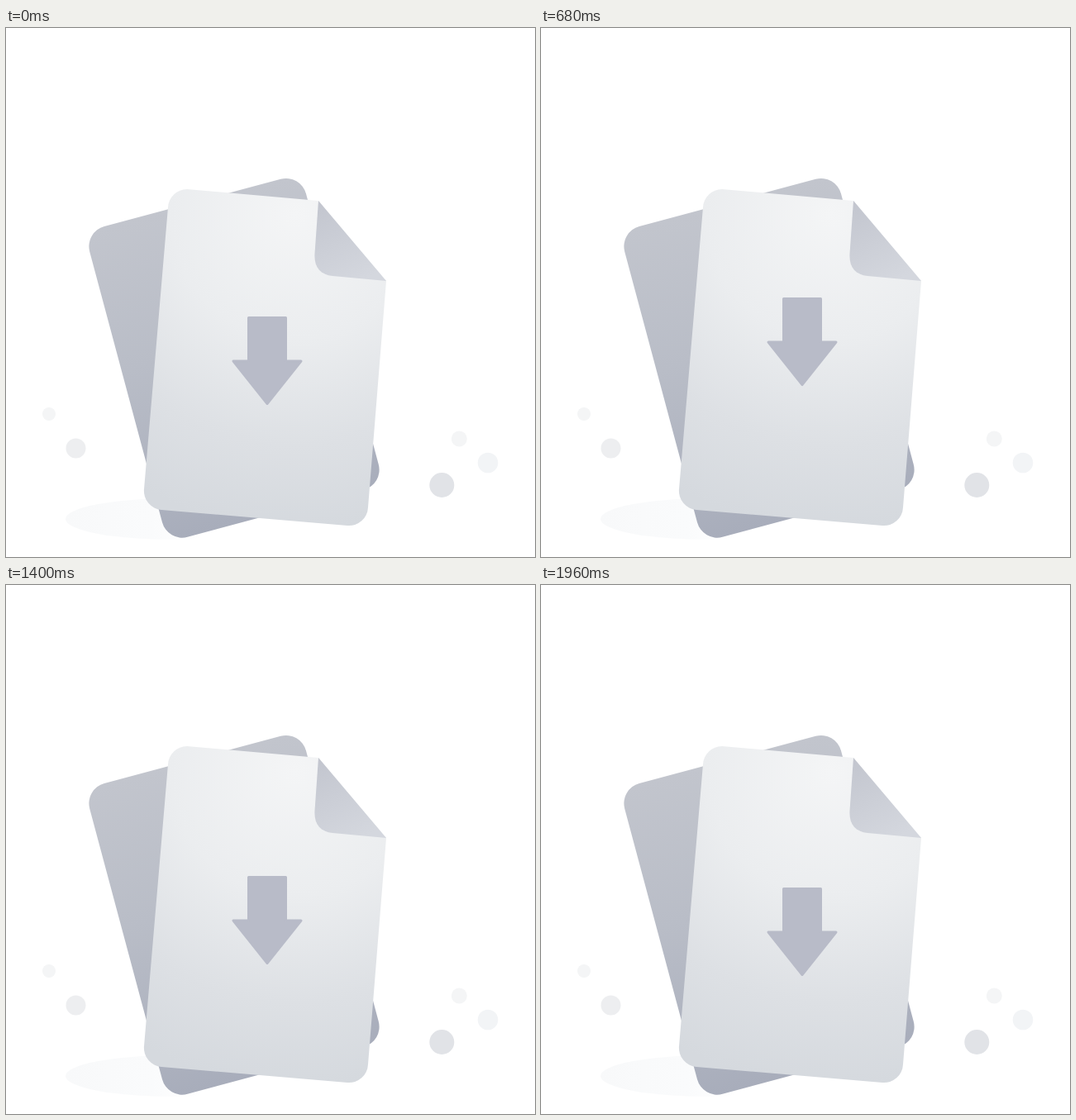
Write an HTML page that moves like this. It is 640 px wide and 640 px high and loops after 2 s.

```html
<!DOCTYPE html>
<html lang="en">
<head>
<meta charset="utf-8">
<title>Download</title>
<style>
  html, body { margin: 0; width: 100%; height: 100%; overflow: hidden; background: #fff; }
  svg { display: block; width: 100vw; height: 100vh; }
</style>
</head>
<body>
<svg viewBox="0 0 640 640">
  <defs>
    <linearGradient id="back" x1="0" y1="0" x2="0" y2="1">
      <stop offset="0" stop-color="#c2c5cd"/>
      <stop offset=".45" stop-color="#b9bdc7"/>
      <stop offset="1" stop-color="#a8adbb"/>
    </linearGradient>
    <radialGradient id="front" gradientUnits="userSpaceOnUse" cx="350" cy="225" r="400">
      <stop offset="0" stop-color="#f4f5f6"/>
      <stop offset=".38" stop-color="#ebedef"/>
      <stop offset=".7" stop-color="#dde0e4"/>
      <stop offset=".95" stop-color="#d5d9de"/>
    </radialGradient>
    <linearGradient id="fold" gradientUnits="userSpaceOnUse" x1="376" y1="215" x2="420" y2="310">
      <stop offset="0" stop-color="#c3c6cf"/>
      <stop offset="1" stop-color="#d4d7de"/>
    </linearGradient>
    <linearGradient id="shade" gradientUnits="userSpaceOnUse" x1="72" y1="0" x2="235" y2="0">
      <stop offset="0" stop-color="#f8f9fa"/>
      <stop offset=".65" stop-color="#fafbfc"/>
      <stop offset="1" stop-color="#fff"/>
    </linearGradient>
  </defs>

  <ellipse cx="202" cy="594" rx="130" ry="25" fill="url(#shade)"/>

  <circle cx="52" cy="467" r="8" fill="#f4f5f6"/>
  <circle cx="84.5" cy="508.5" r="12" fill="#edeef0"/>
  <circle cx="527.3" cy="553" r="15" fill="#e1e3e7"/>
  <circle cx="548.3" cy="497" r="9.5" fill="#f4f5f6"/>
  <circle cx="583" cy="526" r="12.3" fill="#f2f4f6"/>

  <rect x="-135.5" y="-194.5" width="271" height="389" rx="25" fill="url(#back)"
        transform="translate(276 399.3) rotate(-15)"/>

  <path fill="url(#front)" d="M219 195 L378 209 L460 306 L438 580 A23 23 0 0 1 413 602
        L188 583 A23 23 0 0 1 167 558 L196 217 A23 23 0 0 1 219 195 Z"/>
  <path fill="url(#fold)" d="M378 209 L373.5 273 C372.5 289 380 298.5 395 300 L460 306 Z"/>

  <path id="arrow" fill="#b8bbc8" stroke="#b8bbc8" stroke-width="3" stroke-linejoin="round"
        d="M293.5 1.5 H338.5 V54 H357 L316 105.5 L275 54 H293.5 Z"/>
</svg>
<script>
  const LOOP = 2000, STEP = 40, TURN = 1000;
  const START = 349, HIGH = 317, LOW = 366;
  const arrow = document.getElementById('arrow');

  const mix = (a, b, k) => a + (b - a) * k;
  const rise = p => p + 0.25 * p * p * (1 - p);
  const drop = p => 1 - Math.pow(1 - p, 2.45);

  function arrowY(t) {
    return t < TURN
      ? mix(START, HIGH, rise(t / TURN))
      : mix(HIGH, LOW, drop((t - TURN) / (LOOP - TURN)));
  }

  function draw(now) {
    const t = Math.floor((now % LOOP) / STEP) * STEP;
    arrow.setAttribute('transform', `translate(0 ${arrowY(t).toFixed(2)})`);
  }

  const origin = performance.now();
  function tick() {
    draw(performance.now() - origin);
    requestAnimationFrame(tick);
  }
  tick();
</script>
</body>
</html>
```
